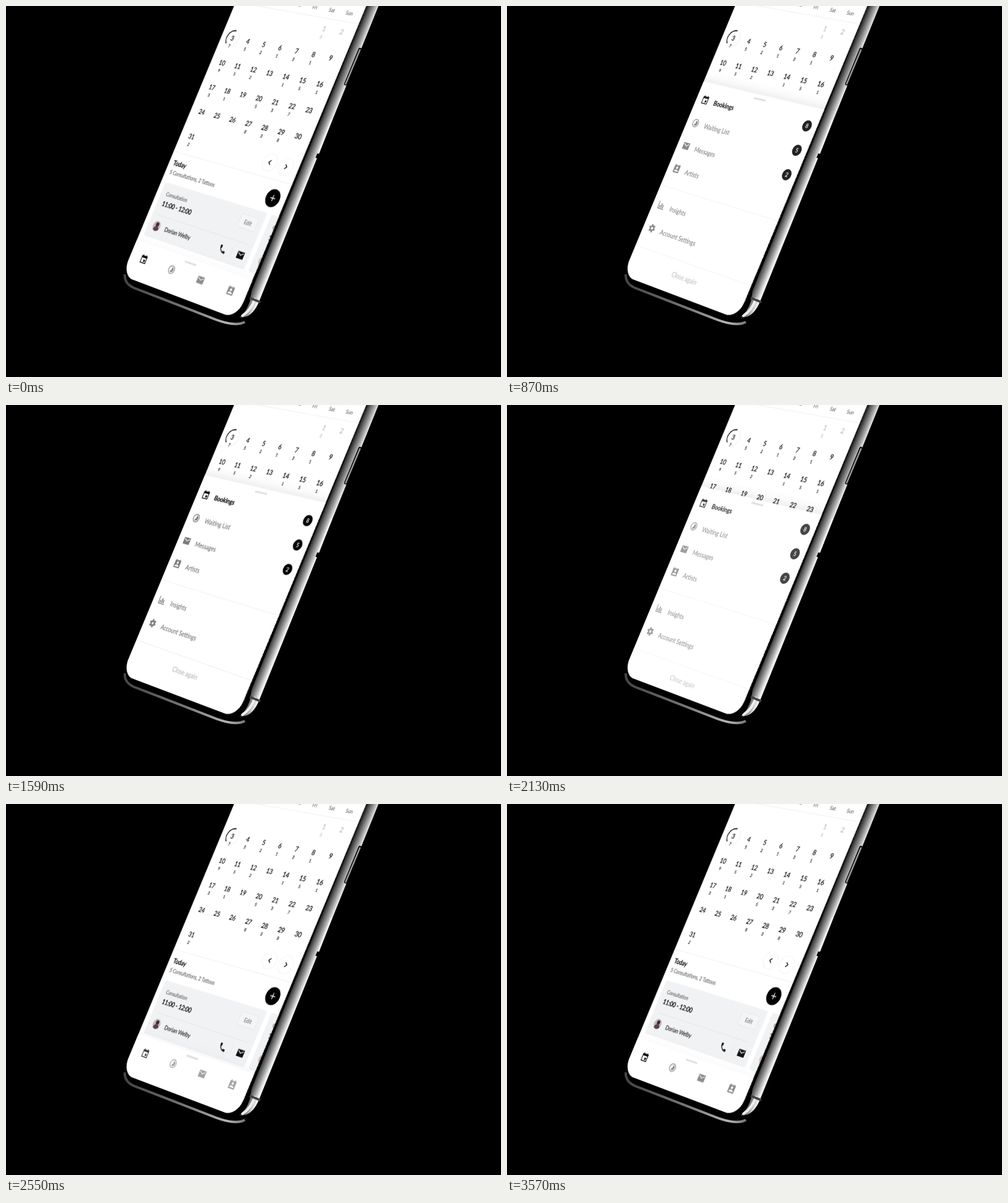
An HTML page that plays this animation: 800x600 px, repeating every 3600 ms.

```html
<!DOCTYPE html>
<html>
<head>
<meta charset="utf-8">
<style>
  html, body { margin: 0; width: 100%; height: 100%; overflow: hidden; background: #000; }
  svg { position: absolute; left: 0; top: 0; overflow: visible; }
  /* lays the flat 375 unit wide screen onto the tilted phone */
  #screen {
    transform-origin: 0 0;
    transform: matrix3d(.427, .0902, 0, -.000196, -.275, .6625, 0, 0, 0, 0, 1, 0, 350, 48.62, 0, 1.00735) scale(1.5625);
    font-family: Lato, "Open Sans", sans-serif;
    text-rendering: geometricPrecision;
  }
</style>
</head>
<body>
<svg width="800" height="600">
  <defs>
    <linearGradient id="side" gradientUnits="userSpaceOnUse" x1="583" y1="0" x2="600" y2="7">
      <stop offset="0" stop-color="#151515"/>
      <stop offset=".3" stop-color="#5a5a5a"/>
      <stop offset=".65" stop-color="#a0a0a0"/>
      <stop offset="1" stop-color="#f0f0f0"/>
    </linearGradient>
    <linearGradient id="base">
      <stop offset="0" stop-color="#444"/>
      <stop offset=".5" stop-color="#777"/>
      <stop offset=".85" stop-color="#b5b5b5"/>
      <stop offset="1" stop-color="#777"/>
    </linearGradient>
  </defs>
  <path fill="url(#side)" d="M583 0H602L409 478Q401 497 389 502Q381 505 377 503Q388 496 394 478L397 460Z"/>
  <path fill="none" stroke="#eee" stroke-width="4" stroke-linecap="round" d="M402 474Q396 492 382 501"/>
  <path fill="none" stroke="url(#base)" stroke-width="4" d="M192 434Q191 449 207 456L340 507.500Q371 519 386 511"/>
  <path stroke="#000" stroke-width="5" stroke-linecap="round" d="M572 70L549 126"/>
  <path stroke="#999" stroke-width="2.5" stroke-linecap="round" d="M572 71L549 126"/>
  <path stroke="#f4f4f4" stroke-width="2.5" d="M526 184L505 238"/>
  <path stroke="#000" stroke-width="4" d="M505 239L502 246"/>
  <path stroke="#444" stroke-width="4" d="M394 472L411 479"/>
</svg>
<svg id="screen" width="240" height="384" viewBox="0 0 375 600"></svg>

<script>
const ICONS = {
  event: "M3 3h18v18H3zM5 8v11h14V8zM12 12h5v5h-5zM6 1h2v2H6zM16 1h2v2h-2z",
  wait: "M2 12a10 10 0 1 0 20 0a10 10 0 1 0-20 0zM4 12a8 8 0 1 0 16 0a8 8 0 1 0-16 0zM12 6v6l-4.2 4.2A6 6 0 1 0 12 6z",
  mail: "M2 4h20v16H2zM4 8l8 5 8-5V6l-8 5-8-5z",
  artist: "M3 3h18v18H3zM6 1h2v2H6zM16 1h2v2h-2zM9 9a3 3 0 1 0 6 0a3 3 0 1 0-6 0zM6 18v-1c0-4 12-4 12 0v1z",
  phone: "M3 4Q3 3 4 3h3.500q1 0 1 1q0 2 .6 3.600q.1.600-.3 1l-2.200 2.200q2.200 4.400 6.600 6.600l2.200-2.200q.4-.4 1-.2q1.600.5 3.600.5q1 0 1 1V20q0 1-1 1A17 17 0 0 1 3 4z",
  chart: "M2 3h2v16h18v2H2zM6 12h3v6H6zM11 7h3v11h-3zM16 10h3v8h-3z"
};

// a hairline stroke gives the text its medium weight
const text = (x, y, size, str, fill = "#111", weight = 400, anchor = "start") =>
  `<text x="${x}" y="${y + size * .36}" font-size="${size}" fill="${fill}" stroke="${fill}" stroke-width=".3" font-weight="${weight}" text-anchor="${anchor}">${str}</text>`;
const mid = (x, y, size, str, fill, weight) => text(x, y, size, str, fill, weight, "middle");
const icon = (name, x, y, fill) =>
  `<path transform="translate(${x - 12} ${y - 12})" fill="${fill}" fill-rule="evenodd" d="${ICONS[name]}"/>`;
const disc = (x, y, r, fill, stroke = "none", more = "") =>
  `<circle cx="${x}" cy="${y}" r="${r}" fill="${fill}" stroke="${stroke}" ${more}/>`;
const line = (d, stroke = "#ebebeb", width = 1.2) => `<path d="${d}" fill="none" stroke="${stroke}" stroke-width="${width}"/>`;
const box = (x, y, w, h, r, fill, stroke = "none") =>
  `<rect x="${x}" y="${y}" width="${w}" height="${h}" rx="${r}" fill="${fill}" stroke="${stroke}"/>`;
const gear = (x, y, c) => disc(x, y, 8.5, "none", c, 'stroke-width="3" stroke-dasharray="4.45"') +
  disc(x, y, 5.3, "none", c, 'stroke-width="4.5"');

function calendar() {
  const counts = "3 752131 952 15131 537    838 2";
  let out = ["Mon", "Tue", "Wed", "Thu", "Fri", "Sat", "Sun"]
    .map((d, i) => mid(37.5 + 50 * i, -103, 12, d, "#777")).join("");
  out += line("M0 -83H375") + disc(38.5, 1, 19, "none", "#e4e4e4") + line("M25 14.500A19 19 0 0 1 40.500 -18", "#000", 2.4);
  for (let d = 1; d <= 31; d++) {
    const x = 37.5 + (d + 4) % 7 * 50, y = (Math.floor((d + 4) / 7) - 1) * 60;
    out += mid(x, y, 16, d, d < 3 ? "#bbb" : "#111", 500);
    out += mid(x, y + 19, 10, counts[d - 1], d < 3 ? "#bbb" : "#222", 500);
  }
  return out;
}

function card(x) {
  const face = disc(44, 457, 12, "#cdb4b8") + disc(45, 453, 5, "#3a2c30") +
    `<path d="M36 466Q37 458 45 458Q53 458 53 465Q45 472 36 466Z" fill="#54434a"/>`;
  return `<g transform="translate(${x})">` + box(16, 356, 324, 130, 6, "#f0f2f4") +
    text(33, 381, 12.5, "Consultation", "#666") + text(33, 404, 16, "11:00 - 12:00", "#000", 600) +
    box(273, 373, 52, 30, 3, "#f4f5f6", "#e1e4e6") + mid(299, 388, 13, "Edit", "#777") +
    line("M32 432H324", "#e2e5e7") + face + text(72, 458, 14, "Dorian Welby", "#333", 500) +
    line("M287 447V470", "#e2e5e7") + icon("phone", 260, 459, "#111") + icon("mail", 315, 459, "#111") + "</g>";
}

function menu() {
  const grey = "#7a7a7a";
  const rows = [["event", "Bookings", 8], ["wait", "Waiting List", 5], ["mail", "Messages", 2], ["artist", "Artists"]];
  let out = rows.map(([name, label, n], i) => {
    const y = 143 + 56 * i, fill = i ? grey : "#000";
    return icon(name, 30, y, fill) + text(59, y + 1, 15.7, label, fill, i ? 400 : 700) +
      (n ? disc(346.5, y + 1.5, 12.5, "#000") + mid(346.5, y + 1.5, 13, n, "#fff") : "");
  }).join("");
  out += line("M0 356H375") + icon("chart", 30, 400, grey) + text(59, 401, 15.7, "Insights", grey);
  out += gear(30, 456, grey) + text(59, 457, 15.7, "Account Settings", grey);
  return out + line("M0 504H375") + mid(184, 537, 16, "Close again", "#bbb");
}

const nav = ["event", "wait", "mail", "artist"]
  .map((n, i) => icon(n, 47 + 93.7 * i, 538, i ? "#8c8c8c" : "#000")).join("");

const $ = id => document.getElementById(id);
$("screen").innerHTML = `
  <defs>
    <clipPath id="glass"><rect x="2" y="-200" width="372" height="789" rx="37"/></clipPath>
    <linearGradient id="fade" x2="0" y2="1">
      <stop offset="0" stop-opacity="0"/><stop offset=".5" stop-opacity=".02"/><stop offset="1" stop-opacity=".065"/>
    </linearGradient>
  </defs>
  <g clip-path="url(#glass)">
    ${box(0, -200, 375, 800, 0, "#fff")}
    ${calendar()}
    ${disc(290, 250, 20, "#fff", "#ececec")}${line("M293 245L287.500 250L293 255", "#000", 2)}
    ${disc(338, 250, 20, "#fff", "#ececec")}${line("M335.500 245L341 250L335.500 255", "#000", 2)}
    ${line("M0 283H375")}
    ${text(16, 308, 16, "Today", "#000", 600)}
    ${text(16, 330.5, 13, "5 Consultations, 2 Tattoos", "#666")}
    ${disc(338, 322, 20, "#000")}${line("M331 322H345M338 315V329", "#fff", 2)}
    ${card(0)}${card(337)}
    <g id="panel">
      <rect id="shade" y="473" width="375" height="28" fill="url(#fade)"/>
      ${box(0, 501, 375, 600, 0, "#fff")}
      ${box(169, 509, 37, 4, 2, "#dedede")}
      <g id="nav">${nav}</g>
    </g>
    <g id="menu">${menu()}</g>
  </g>`;

const easeOut = x => x <= 0 ? 0 : x >= 1 ? 1 : 1 - 2 ** (-10 * x);
const clamp = x => Math.max(0, Math.min(1, x));

function draw(now) {
  const t = Math.floor(now % 3600 / 30) * 30;
  const p = easeOut((t - 620) / 508) - easeOut((t - 2122) / 795);
  $("panel").setAttribute("transform", `translate(0 ${-402 * p})`);
  $("shade").setAttribute("opacity", .25 + .75 * clamp(8 * p));
  $("nav").setAttribute("opacity", clamp(1 - 8 * p));
  $("menu").setAttribute("transform", `translate(0 ${300 * (1 - p)})`);
  $("menu").setAttribute("opacity", clamp(1 - 4 * (1 - p)));
  requestAnimationFrame(draw);
}
draw(0);
</script>
</body>
</html>
```
